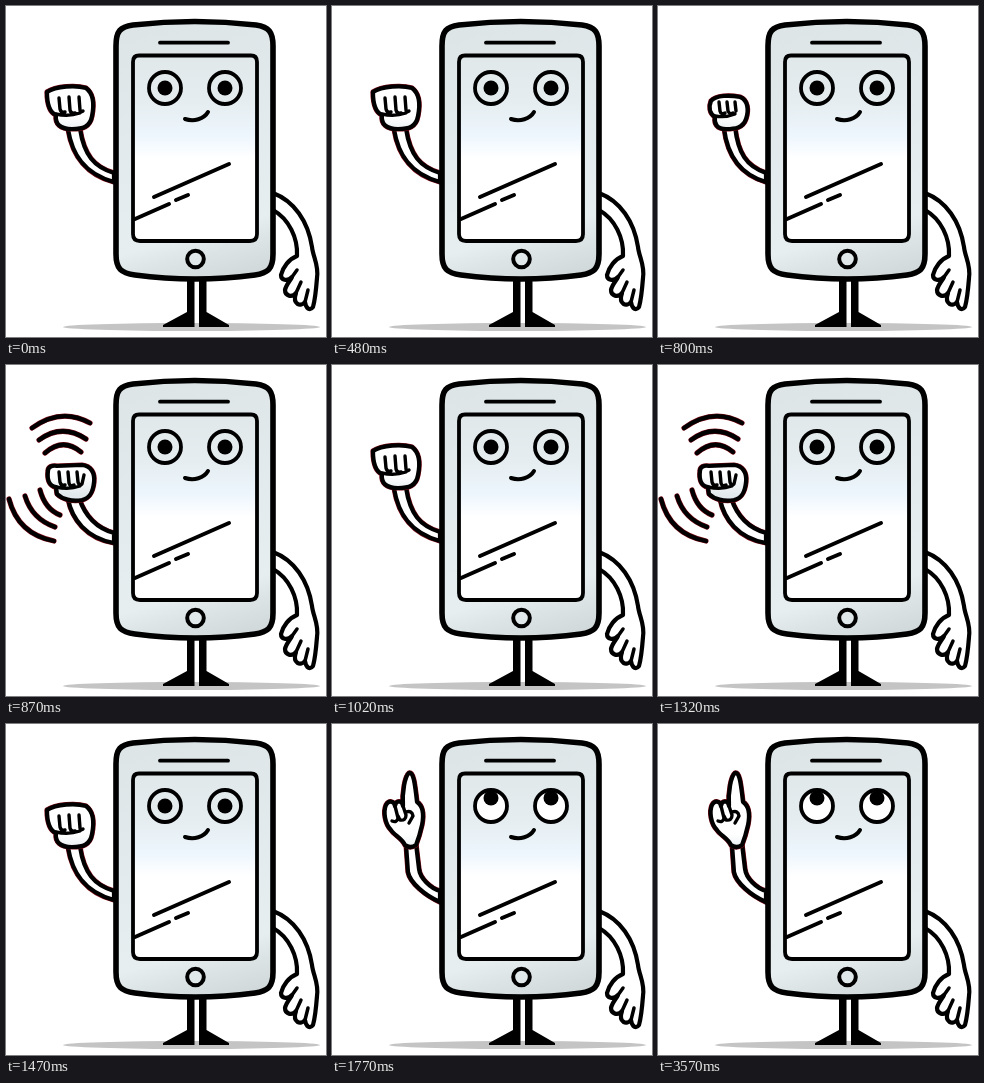
Write an HTML page with a canvas that moves like this. It is 320 px wide and 331 px high and loops after 4.77 s.

```html
<!DOCTYPE html>
<html lang="en">
<head>
<meta charset="utf-8">
<title>Knocking phone</title>
<style>
html, body { margin: 0; width: 100%; height: 100%; overflow: hidden; background: #fff; }
canvas { display: block; width: 320px; height: 331px; }
</style>
</head>
<body>
<canvas id="stage" width="320" height="331"></canvas>
<script>
const ctx = document.getElementById('stage').getContext('2d');
const INK = '#000';
const FRINGE = '#7c0a14';

const POSES = {
  raised: {
    arm: 'M62 123C66 148 78 168 108 176L108 167C88 161 78 149 74 123',
    hand: 'M41 86C50 80 70 79 80 82C88 88 88 100 86 110C84 121 77 123 66 123C54 123 49 118 50 109C43 106 41 96 41 86Z',
    lines: 'M53 92L54 103Q55 107 59 106M63 91L64 104Q65 108 69 107M73 91L74 104Q74 107 77 105M50 108Q62 111 74 107'
  },
  tilted: {
    arm: 'M66 122C69 147 80 168 108 176L108 167C88 160 80 147 77 121',
    hand: 'M53 95C58 89 72 89 82 91C90 94 91 104 88 113C85 122 77 123 68 123C59 123 56 118 57 111C51 107 51 100 53 95Z',
    lines: 'M61 96L62 105Q63 109 67 107M69 96L70 105Q72 109 75 107M77 96L78 105M57 110Q67 112 77 108'
  },
  knock: {
    arm: 'M62 134C66 154 80 173 108 178L108 168C90 163 79 151 73 133',
    hand: 'M42 106C42 102 46 100 51 101L76 100C85 101 89 108 88 117C87 127 84 133 76 135C66 137 56 134 51 129L50 122C43 121 41 114 42 106Z',
    lines: 'M53 107L54 117Q55 121 59 120M62 107L63 118Q64 122 68 120M71 107L72 117Q73 121 76 119L78 110M50 122Q63 125 74 121',
    waves: 'M39 88Q57 72 75 87M33 75Q56 58 80 74M26 63Q55 42 84 58' +
           'M34 125Q39 144 54 150M19 131Q26 154 49 162M3 134Q12 169 48 176'
  },
  pointing: {
    arm: 'M74 120L76 148C78 159 94 172 108 178L108 167C98 164 88 154 87 145L84 120',
    hand: 'M71 82C70 68 73 52 77 49C82 48 83 62 85 78C91 82 92 91 90 101C88 110 86 116 84 121Q78 125 73 121C70 114 62 111 59 106C53 100 51 88 54 81C57 76 62 77 63 82C64 76 70 76 71 82Z',
    lines: 'M63 82L66 94Q65 99 60 97M71 82L74 91Q74 97 68 96L66 92M74 88Q80 86 81 92L77 99',
    lookUp: true
  }
};

// Pose and the time (ms) at which it ends
const TIMELINE = [
  ['raised', 800], ['tilted', 870], ['knock', 1020], ['raised', 1320],
  ['knock', 1470], ['raised', 1770], ['pointing', 4770]
];
const LOOP = TIMELINE[TIMELINE.length - 1][1];

function gradient(x0, y0, x1, y1, stops) {
  const g = ctx.createLinearGradient(x0, y0, x1, y1);
  stops.forEach(([at, color]) => g.addColorStop(at, color));
  return g;
}

const bodyFill = gradient(150, 20, 220, 275, [
  [0, '#dde5e7'], [.5, '#e3ebee'], [.8, '#e7eef0'], [.88, '#dce4e5'], [1, '#d0d8d9']
]);
const screenFill = gradient(0, 50, 0, 152, [
  [0, '#e0e8ea'], [.45, '#e5edf0'], [.78, '#edf6fd'], [1, '#fff']
]);
const handFill = gradient(0, 80, 0, 130, [[0, '#fff'], [.6, '#fff'], [1, '#e1e9ec']]);

function stroke(path, width, color = INK) {
  ctx.strokeStyle = color;
  ctx.lineWidth = width;
  ctx.stroke(new Path2D(path));
}

function shape(path, fill, width = 0) {
  ctx.fillStyle = fill;
  ctx.fill(new Path2D(path));
  if (width) stroke(path, width);
}

function fringed(path, width, fill) {
  stroke(path, width + 1, FRINGE);
  if (fill) shape(path, fill);
  stroke(path, width);
}

function disc(x, y, r, fill, width = 0) {
  ctx.beginPath();
  ctx.arc(x, y, r, 0, Math.PI * 2);
  ctx.fillStyle = fill;
  ctx.fill();
  if (width) {
    ctx.strokeStyle = INK;
    ctx.lineWidth = width;
    ctx.stroke();
  }
}

function drawLegs() {
  ctx.beginPath();
  ctx.ellipse(185.5, 321, 128.5, 4, 0, 0, Math.PI * 2);
  ctx.fillStyle = '#c4c4c4';
  ctx.fill();
  shape('M181 274H188.5V321H157V319L181 306Z', INK);
  shape('M193 274H200.5V306L223 319V321H193Z', INK);
}

function drawRightArm() {
  shape('M267 187C288 195 302 215 306 241C307 251 313 259 311 272C310 285 309 294 307 301' +
        'C304 305 300 303 299 296C295 301 286 299 290 287C286 292 279 290 279 284' +
        'C280 279 284 275 286 271C281 276 275 274 275 269C277 261 283 253 291 250' +
        'C292 232 283 213 267 204Z', '#fff', 4.2);
  stroke('M290 287L295 276M299 296L302 284M286 271L291 264', 3.5);
}

function drawPhone() {
  shape('M110 40C110 25 114 21 127 19Q189 12 250 19C263 21 267 26 267 40V248' +
        'C267 263 262 267 249 269Q189 277 129 269C115 267 110 263 110 248Z', bodyFill, 5.6);
  stroke('M154 36.7H222', 3.8);
  shape('M133 49.5H245Q251 49.5 251 56V228Q251 235 244 235H134Q127 235 127 228V56Q127 49.5 133 49.5Z', screenFill, 3.8);
  stroke('M148 191L223 158M129 213L163 198M170 194L182 189', 4);
  disc(189.5, 253, 8.3, '#e1e8ea', 4);
}

function drawFace(lookUp) {
  for (const x of [159, 219]) {
    disc(x, 82, 16, lookUp ? '#fff' : '#e3ebed', 3.8);
    disc(x, lookUp ? 74 : 82, 7.5, INK);
  }
  stroke('M179 113C188 116 198 113 202 106', 4);
}

function draw(pose) {
  ctx.fillStyle = '#fff';
  ctx.fillRect(0, 0, 320, 331);
  drawLegs();
  drawRightArm();
  fringed(pose.arm, 4.2, '#fff');
  drawPhone();
  drawFace(pose.lookUp);
  fringed(pose.hand, 4.2, handFill);
  stroke(pose.lines, 3.4);
  if (pose.waves) fringed(pose.waves, 4.2);
}

function tick(now) {
  const t = now % LOOP;
  const [name] = TIMELINE.find(([, end]) => t < end);
  draw(POSES[name]);
  requestAnimationFrame(tick);
}

ctx.lineCap = ctx.lineJoin = 'round';
tick(performance.now());
</script>
</body>
</html>
```
